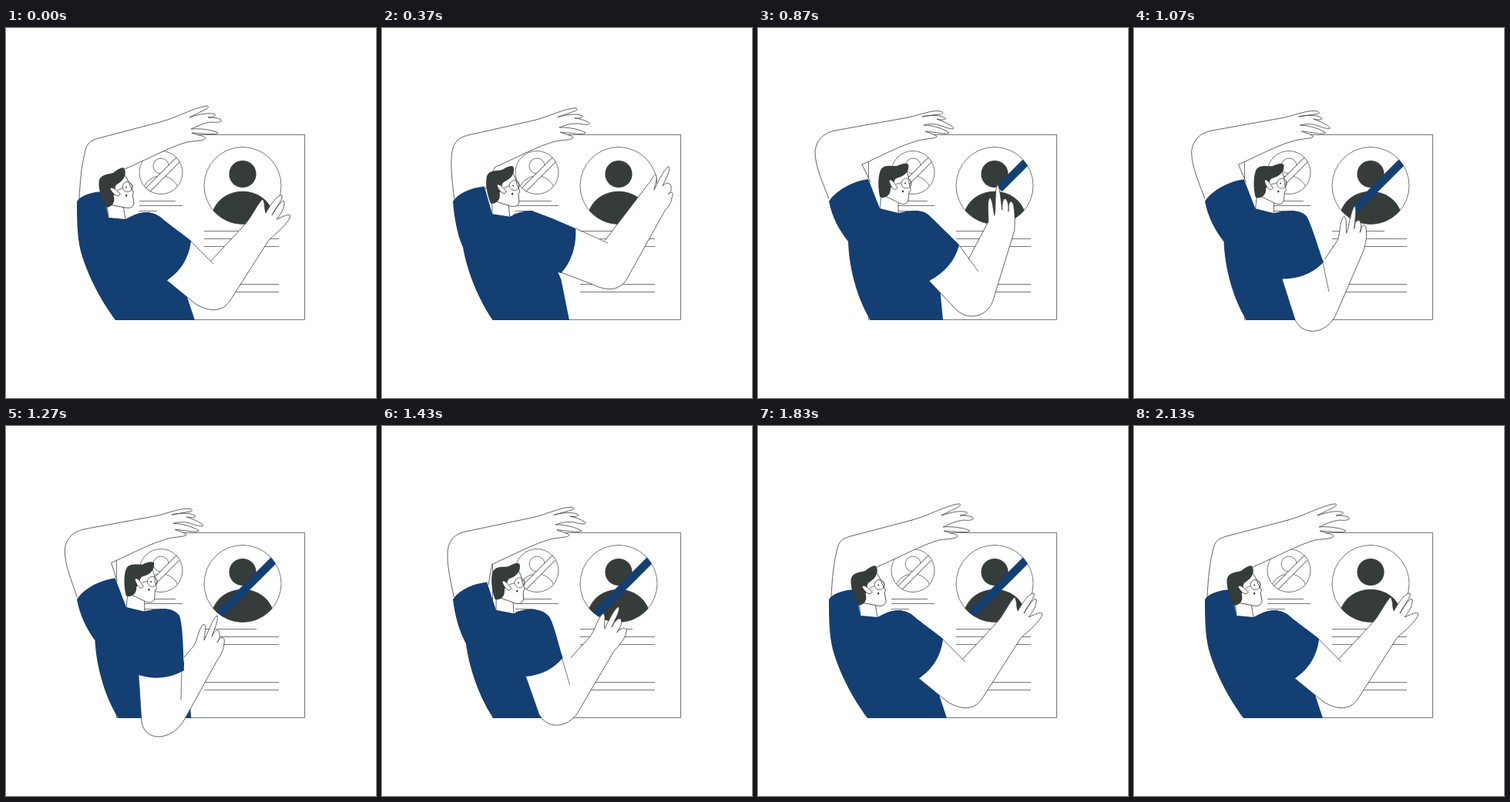
Animation, 480 px wide and 480 px high, one loop 2500 ms. Source, as an HTML page:

```html
<!DOCTYPE html>
<html lang="en">
<head>
<meta charset="utf-8">
<title>Profile review</title>
<style>
  html, body { margin: 0; width: 100%; height: 100%; overflow: hidden; background: #fff; }
  svg { display: block; width: 100%; height: 100%; }
  .line { fill: none; stroke: #4a4a4a; stroke-width: .75; stroke-linejoin: round; }
  .skin { fill: #fff; stroke: #3c3c3c; stroke-width: .8; stroke-linejoin: round; }
  .blue { fill: #133f73; }
  .dark { fill: #363c3a; }
</style>
</head>
<body>
<svg viewBox="0 0 480 480">
  <defs>
    <clipPath id="big"><circle cx="307" cy="204.500" r="50"/></clipPath>
    <clipPath id="small"><circle cx="201" cy="187.500" r="28"/></clipPath>
  </defs>

  <g class="line">
    <rect x="143.500" y="138.500" width="244" height="240"/>
    <path d="M173 224.500H220M173 230.500H229M173 237.500H196"/>
    <path d="M257 263.500H325M257 273.500H354M257 283.500H354M257 332.500H354M257 342.500H354"/>
    <g clip-path="url(#small)">
      <circle cx="201" cy="179" r="10"/>
      <path d="M178 209.500C184 186 218 186 224 209.500"/>
      <path d="M231 163L171 223" style="stroke-width:7.800"/>
      <path d="M231 163L171 223" style="stroke:#fff;stroke-width:6.300"/>
    </g>
    <circle cx="201" cy="187.500" r="28"/>
  </g>

  <g clip-path="url(#big)">
    <circle class="dark" cx="307" cy="189.500" r="17.600"/>
    <path class="dark" d="M266 244C276 201 338 201 348 244V260H266Z"/>
    <path id="stripe" fill="none" stroke="#133f73" stroke-width="10.500"/>
  </g>
  <circle class="line" cx="307" cy="204.500" r="50"/>

  <path id="backArm" class="skin"/>
  <path id="neck" class="skin"/>
  <path id="torso" class="blue"/>

  <g id="head">
    <path class="skin" d="M192 184C195 190 196 197 196 202L198 210C198 212 197 213 196 213L195 224C193 230 187 230 182 227L166 219L172 195Z"/>
    <path class="dark" d="M158 219C155 205 156 189 160 183C165 177 174 180 180 179.500C186 177 192 175 195 177.500C197 186 190 193 181 195C177 196 176 200 176 205L172 208C172 214 170 218 165 220C162 221 159 221 158 219Z"/>
    <path class="skin" d="M170 198C174 195 178 204 181 208C178 213 172 208 170 198Z"/>
    <path class="line" d="M179 203L186 201.500M197 198C199 201 199 205 196.500 207"/>
    <circle class="line" cx="192.500" cy="202" r="6.500"/>
    <circle class="dark" cx="191" cy="202" r="1"/>
    <ellipse class="dark" cx="188" cy="212.500" rx="1.200" ry="1.400"/>
  </g>

  <path id="arm" class="skin"/>
  <path id="crease" class="line"/>
  <path id="sleeve" class="blue"/>
</svg>

<script>
const LOOP = 2500;
const TIMES = [0, 370, 530, 870, 1270, 1630, 1830];
const LEAN = [0, .4, .84, 1, .92, .11, 0];

// Two poses: upright and leaning towards the poster
const LEANING = {
  backArm: [
    'M95 222C96 200 98 178 102 163C104 150 109 146 120 143L200 122C222 116 242 104 260 101C264 101 263 104 258 106L238 116C250 112 264 109 271 112C273 114 268 116 262 116C270 116 277 117 279 119C281 122 274 123 267 122C257 123 249 127 240 131C252 130 268 132 275 136C273 139 258 137 241 136C248 139 258 140 259 143C257 147 245 146 235 148C215 153 180 172 154 183L126 216',
    'M92 222C84 200 74 180 74 160C76 144 86 136 100 133L195 116C212 112 226 106 237 108C242 110 240 112 234 112L213 115C226 112 238 113 243 117C245 119 238 120 232 118C240 121 251 126 254 130C253 132 246 130 238 127C230 124 222 124 215 126C226 126 242 131 248 136C244 139 230 135 217 134C224 137 232 139 232 141C228 144 220 143 208 146C185 152 160 166 135 177L146 200'],
  neck: [
    'M131 228L133 247L155 249L152 230',
    'M160 218L158 235L182 241L182 224'],
  torso: [
    'M92 225C97 217 110 213 126 212L133 246L155 248C165 242 178 239 186 239L215 290L232 340L245 379L142 379C124 355 106 322 97 290C92 270 92 245 92 225Z',
    'M92 225C101 211 122 199 143 196L158 234L182 240C190 238 198 237 208 237L220 290L233 306L240 379L146 379C128 350 118 310 117 277C105 262 96 245 92 225Z']
};

// Rest, reach, touch, draw, finish
const REACHING = {
  arm: [
    'M265 303L308 257C318 247 326 228 333 222C336 226 335 234 337 240C344 228 352 216 358 217C360 222 350 232 345 243C352 232 358 222 361 225C362 234 355 243 351 248C358 245 368 240 369 244C366 254 352 265 341 275L293 350C284 367 268 371 246 358L208 327L239 276',
    'M289 276L345 203C349 199 351 192 355 190C358 194 354 203 353 210C358 200 367 181 372 180C375 184 368 196 364 205C369 199 375 201 375 207C376 211 374 214 371 216C376 211 379 214 376 220C375 228 371 233 367 237L318 325C309 341 292 342 274 333L232 317L251 262',
    'M299 265L337 183C341 176 345 168 349 167C352 172 349 181 348 188C353 175 361 156 366 155C368 161 362 174 359 184C364 176 369 178 369 184C370 189 368 194 366 197C372 185 374 189 373 195C372 203 368 208 364 212L336 300C330 322 315 326 299 323L249 311L260 250',
    'M273 300L299 251C299 238 297 224 301 220C305 224 305 236 307 243C309 232 307 208 311 203C315 210 315 226 317 236C316 220 322 218 324 226C326 232 325 236 325 238C324 222 331 222 332 232C334 245 333 255 333 262L306 350C300 374 275 381 258 366L222 328L261 282',
    'M231 300L243 286C249 278 250 260 257 257C261 260 257 270 257 278C262 268 269 248 274 246C276 252 270 264 267 273C272 262 277 264 277 270C278 274 276 278 274 281C279 270 285 275 283 281C283 290 278 298 274 304L233 378C218 408 182 412 176 385L172 323L231 312'],
  crease: [
    'M239 276L269 306', 'M251 260L293 279', 'M260 250L301 265', 'M261 282L286 316', 'M228 312L227 356'],
  sleeve: [
    'M165 243C185 234 198 242 206 250C215 257 230 268 240 276C238 296 228 315 208 328L165 300Z',
    'M170 242C180 238 190 237 194 237C212 243 235 253 251 260C253 283 244 306 232 318L175 300Z',
    'M176 241C190 237 198 237 204 237C222 242 242 246 260 250C264 272 258 297 249 312L190 290Z',
    'M182 241C195 237 212 234 222 243C232 253 250 270 261 281C256 302 242 318 222 328L190 290Z',
    'M180 240C200 236 216 234 225 246C230 260 230 300 231 317C212 328 192 329 172 323L175 260Z']
};

const INDEX_TIP = 20;
const NUM = /-?[\d.]+/g;
const el = id => document.getElementById(id);
const lerp = (a, b, k) => a + (b - a) * k;
const mix = (a, b, k) => a.map((v, i) => lerp(v, b[i], k));
const parse = d => d.match(NUM).map(Number);

function setPath(id, shape, values) {
  let i = 0;
  el(id).setAttribute('d', shape.replace(NUM, () => values[i++].toFixed(2)));
}

// Smooth curve through the keys without overshoot
function slope(v, i) {
  if (i === 0 || i === v.length - 1) return 0;
  const a = (v[i] - v[i - 1]) / (TIMES[i] - TIMES[i - 1]);
  const b = (v[i + 1] - v[i]) / (TIMES[i + 1] - TIMES[i]);
  return a * b <= 0 ? 0 : 2 * a * b / (a + b);
}

function tween(v, t) {
  if (t >= TIMES[TIMES.length - 1]) return v[v.length - 1];
  const i = TIMES.findIndex(x => x > t) - 1;
  const h = TIMES[i + 1] - TIMES[i], s = (t - TIMES[i]) / h, r = 1 - s;
  return v[i] * (1 + 2 * s) * r * r + slope(v, i) * h * s * r * r
       + v[i + 1] * s * s * (3 - 2 * s) - slope(v, i + 1) * h * s * s * r;
}

const leaning = Object.entries(LEANING).map(([id, p]) => ({ id, shape: p[0], ends: p.map(parse) }));

const reaching = Object.entries(REACHING).map(([id, p]) => {
  const poses = p.map(parse);
  poses.push(mix(poses[0], poses[4], .03), poses[0]);
  return { id, shape: p[0], tracks: poses[0].map((_, i) => poses.map(q => q[i])) };
});

function drawStripe(t, tipX) {
  const shown = t > 530 && t < 2130;
  const end = t < 1270 ? Math.min(356, 313 - (311 - tipX) * 1.2) : 268;
  el('stripe').setAttribute('d', `M356 165.500L${end.toFixed(2)} ${(521.5 - end).toFixed(2)}`);
  el('stripe').setAttribute('opacity', shown ? Math.min(1, (2130 - t) / 130) : 0);
}

function draw(t) {
  const lean = tween(LEAN, t);
  for (const { id, shape, ends } of leaning) setPath(id, shape, mix(...ends, lean));

  const x = lerp(142, 176, lean), y = lerp(211.5, 202.5, lean);
  el('head').setAttribute('transform',
    `translate(${x} ${y}) rotate(${-16 * (1 - lean)}) translate(-176 -203)`);

  for (const { id, shape, tracks } of reaching) {
    const values = tracks.map(v => tween(v, t));
    setPath(id, shape, values);
    if (id === 'arm') drawStripe(t, values[INDEX_TIP]);
  }
}

const start = performance.now();
function tick() {
  draw((performance.now() - start) % LOOP);
  requestAnimationFrame(tick);
}
tick();
</script>
</body>
</html>
```
